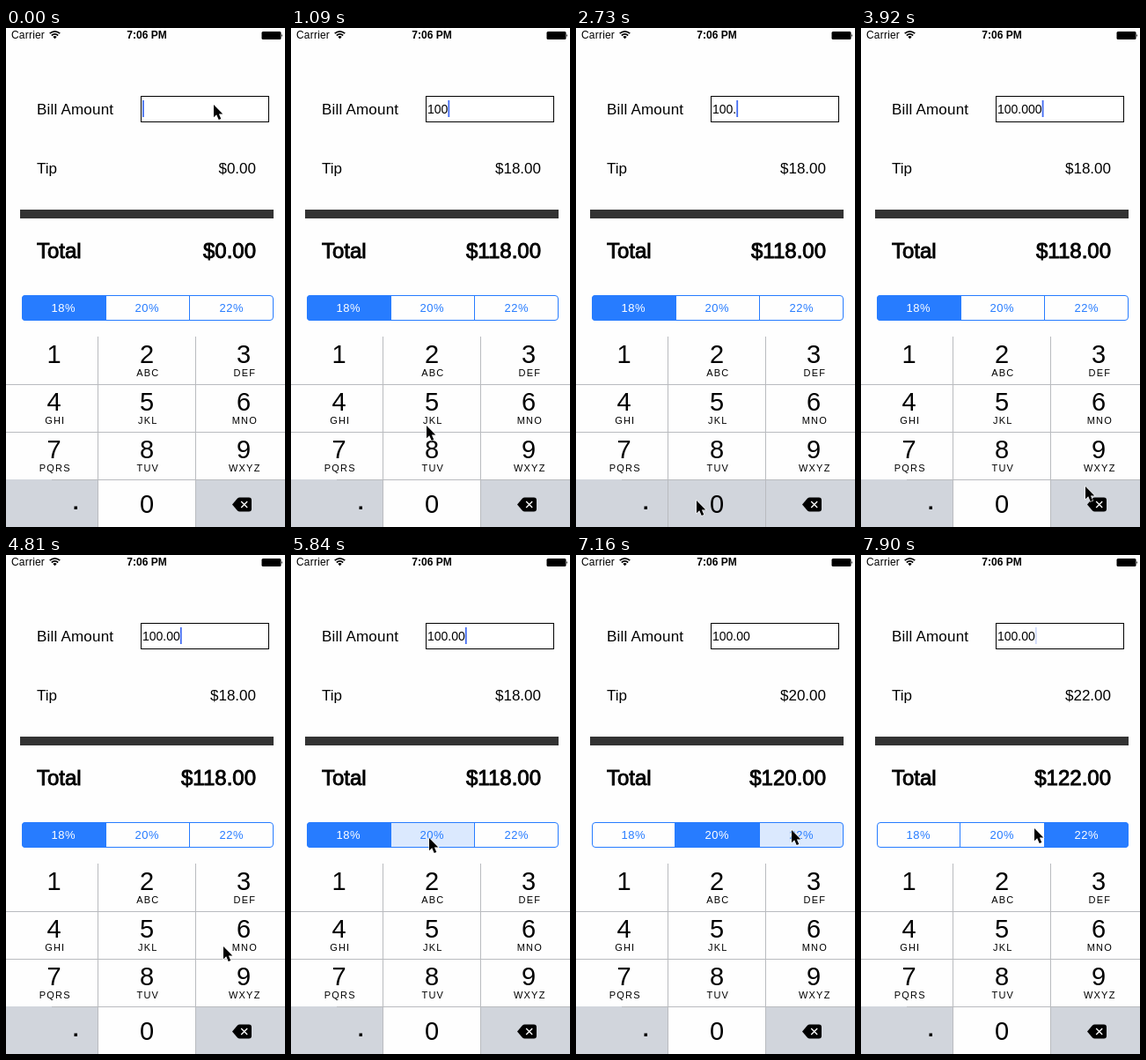
An HTML page that plays this animation: 317 px wide and 566 px high, repeating every 8 s.

```html
<!DOCTYPE html>
<html lang="en">
<head>
<meta charset="utf-8">
<title>Tip calculator</title>
<style>
  html, body { margin: 0; width: 100%; height: 100%; overflow: hidden; background: #fefefe; }
  svg { display: block; width: 317px; height: 566px; font-family: "Liberation Sans", Arial, sans-serif; }
  .label { font-size: 17px; }
  .right { text-anchor: end; }
  .middle { text-anchor: middle; }
  .total { font-size: 24px; stroke: #000; stroke-width: .9px; }
  .status { font-size: 12px; }
  .digit { font-size: 29px; }
  .letters { font-size: 11px; letter-spacing: 1.2px; }
  .rate { font-size: 13px; letter-spacing: .6px; }
</style>
</head>
<body>
<svg viewBox="0 0 317 566">
  <defs><clipPath id="pill"><rect x="18" y="303" width="286" height="29" rx="4"/></clipPath></defs>
  <rect width="317" height="566" fill="#fefefe"/>

  <g class="status">
    <text x="6" y="12" letter-spacing=".2">Carrier</text>
    <text x="160" y="12" class="middle" font-weight="bold">7:06 PM</text>
    <g fill="none" stroke="#000" stroke-width="1.7">
      <path d="M49.7 6.2Q55.5 1.4 61.3 6.2M51.8 8.5Q55.5 5.3 59.2 8.5"/>
    </g>
    <path d="M53.3 9.9Q55.5 8.2 57.7 9.9L55.5 12.3Z"/>
    <rect x="290.5" y="4" width="22" height="9" rx="1.5"/>
    <path d="M313.2 6.8Q315 8.5 313.2 10.2Z"/>
  </g>

  <text x="35" y="98" class="label" letter-spacing=".2">Bill Amount</text>
  <rect x="153.5" y="77.5" width="145" height="29" fill="#fff" stroke="#000"/>
  <text id="bill" x="155" y="97" font-size="14"></text>
  <rect id="caret" y="82" width="1.8" height="19" fill="#426bf2"/>
  <text x="35" y="165" class="label">Tip</text>
  <text id="tip" x="284" y="165" class="label right"></text>
  <rect x="16" y="206" width="288" height="10" fill="#333"/>
  <text x="35" y="261" class="total">Total</text>
  <text id="total" x="284" y="261" class="total right"></text>

  <g id="segments" clip-path="url(#pill)"></g>
  <path d="M112.5 303V332M208.5 303V332" stroke="#277cff"/>
  <rect x="18.5" y="303.5" width="285" height="28" rx="3.5" fill="none" stroke="#277cff"/>

  <rect id="dotKey" x="52" y="512" width="52" height="54"/>
  <rect x="0" y="512" width="52" height="54" fill="#d1d5dc"/>
  <rect id="zeroKey" x="105" y="512" width="110" height="54"/>
  <rect id="deleteKey" x="216" y="512" width="101" height="54"/>
  <path d="M104.5 350V566M215.5 350V566M0 404.5H317M0 458.5H317M52 512.5H317" stroke="#b9bbbf" fill="none"/>
  <g id="keys"></g>
  <rect x="77.5" y="542.5" width="3.5" height="3.5"/>
  <path d="M257 540.5L263 533.5Q264 532.5 265.5 532.5H276Q279 532.5 279 535.5V545.5Q279 548.5 276 548.5H265.5Q264 548.5 263 547.5Z"/>
  <path d="M267.2 537L274.2 544M274.2 537L267.2 544" stroke="#fff" stroke-width="1.3"/>

  <path id="pointer" d="M0 0V14.3L3.2 11.3L5.7 17L8.3 15.9L5.9 10.4H10.3Z" stroke="#fff" stroke-width="1.1" paint-order="stroke"/>
</svg>

<script>
const LOOP = 8000;
const BLUE = '#277cff';
const GRAY = '#d1d5dc';
const RATES = [18, 20, 22];
const PRESSED = 0.16;
const $ = id => document.getElementById(id);

function add(parent, tag, attrs, text = '') {
  const node = document.createElementNS('http://www.w3.org/2000/svg', tag);
  for (const name in attrs) node.setAttribute(name, attrs[name]);
  node.textContent = text;
  parent.append(node);
  return node;
}

const segments = RATES.map((rate, i) => ({
  fill: add($('segments'), 'rect', { x: [18, 113, 208][i], y: 303, width: 96, height: 29, fill: BLUE }),
  text: add($('segments'), 'text', { x: [65.3, 160.3, 256.3][i], y: 322, class: 'rate middle' }, rate + '%')
}));

['', 'ABC', 'DEF', 'GHI', 'JKL', 'MNO', 'PQRS', 'TUV', 'WXYZ'].forEach((letters, i) => {
  const x = [54.5, 160, 270][i % 3];
  const y = 380 + 54 * Math.floor(i / 3);
  add($('keys'), 'text', { x, y, class: 'digit middle' }, i + 1);
  add($('keys'), 'text', { x: x + 1.3, y: y + 15, class: 'letters middle' }, letters);
});
add($('keys'), 'text', { x: 160, y: 550, class: 'digit middle' }, '0');

// Each step changes only the listed parts of the state.
const STEPS = [
  [0, { at: [236, 87], bill: '', rate: 18, levels: [1, 0, 0], down: '', caret: 1 }],
  [500, { bill: '10' }],
  [650, { bill: '100' }],
  [800, { at: [228, 150] }],
  [950, { at: [186, 340] }],
  [1090, { at: [154, 451] }],
  [1240, { at: [150, 490], caret: 0 }],
  [1390, { at: [149, 516] }],
  [1530, { at: [148, 526] }],
  [1680, { at: [116, 532], caret: 1 }],
  [1830, { at: [89, 537] }],
  [2130, { down: 'dot', caret: 0 }],
  [2280, { down: '', bill: '100.', caret: 1 }],
  [2430, { at: [137, 536] }],
  [2730, { down: 'zero' }],
  [2880, { down: '', bill: '100.0' }],
  [3030, { down: 'zero', at: [140, 536] }],
  [3330, { down: '', bill: '100.00' }],
  [3470, { down: 'zero' }],
  [3770, { down: '', bill: '100.000', at: [185, 530] }],
  [3920, { at: [255, 520] }],
  [4060, { at: [263, 530] }],
  [4210, { down: 'delete' }],
  [4360, { down: '', bill: '100.00' }],
  [4660, { at: [259, 500] }],
  [4810, { at: [247, 444] }],
  [4950, { at: [227, 396], caret: 0 }],
  [5100, { at: [198, 352] }],
  [5250, { at: [170, 328] }],
  [5400, { at: [159, 322], caret: 1 }],
  [5540, { at: [157, 321] }],
  [5840, { levels: [1, PRESSED, 0] }],
  [5980, { levels: [0.5, 0.5, 0], rate: 20, caret: 0 }],
  [6130, { levels: [0, 1, 0] }],
  [6430, { at: [164, 321], caret: 1 }],
  [6580, { at: [189, 318] }],
  [6730, { at: [220, 314] }],
  [6870, { at: [241, 312] }],
  [7020, { at: [245, 312], caret: 0 }],
  [7160, { levels: [0, 1, PRESSED] }],
  [7310, { levels: [0, 0.5, 0.5], rate: 22 }],
  [7450, { levels: [0, 0, 1], caret: 1 }],
  [7900, { at: [197, 310], caret: 0.25 }]
];

const stateAt = time => Object.assign({}, ...STEPS.filter(([start]) => start <= time).map(step => step[1]));
const money = value => '$' + value.toFixed(2);

function draw(time) {
  const { at, bill, rate, levels, down, caret } = stateAt(time);
  const amount = Number(bill);
  const dots = bill.includes('.') ? 1 : 0;
  $('bill').textContent = bill;
  $('caret').setAttribute('x', 155 + 7.8 * (bill.length - dots) + 3.9 * dots);
  $('caret').setAttribute('opacity', caret);
  $('tip').textContent = money(amount * rate / 100);
  $('total').textContent = money(amount * (1 + rate / 100));
  segments.forEach(({ fill, text }, i) => {
    fill.setAttribute('opacity', levels[i]);
    text.setAttribute('fill', levels[i] > 0.4 ? '#fff' : BLUE);
  });
  $('dotKey').setAttribute('fill', down === 'dot' ? '#fefefe' : GRAY);
  $('zeroKey').setAttribute('fill', down === 'zero' ? GRAY : '#fefefe');
  $('deleteKey').setAttribute('fill', down === 'delete' ? '#fefefe' : GRAY);
  $('pointer').setAttribute('transform', `translate(${at})`);
}

let begin;
function tick(now) {
  begin ??= now;
  draw((now - begin) % LOOP);
  requestAnimationFrame(tick);
}
draw(0);
requestAnimationFrame(tick);
</script>
</body>
</html>
```
